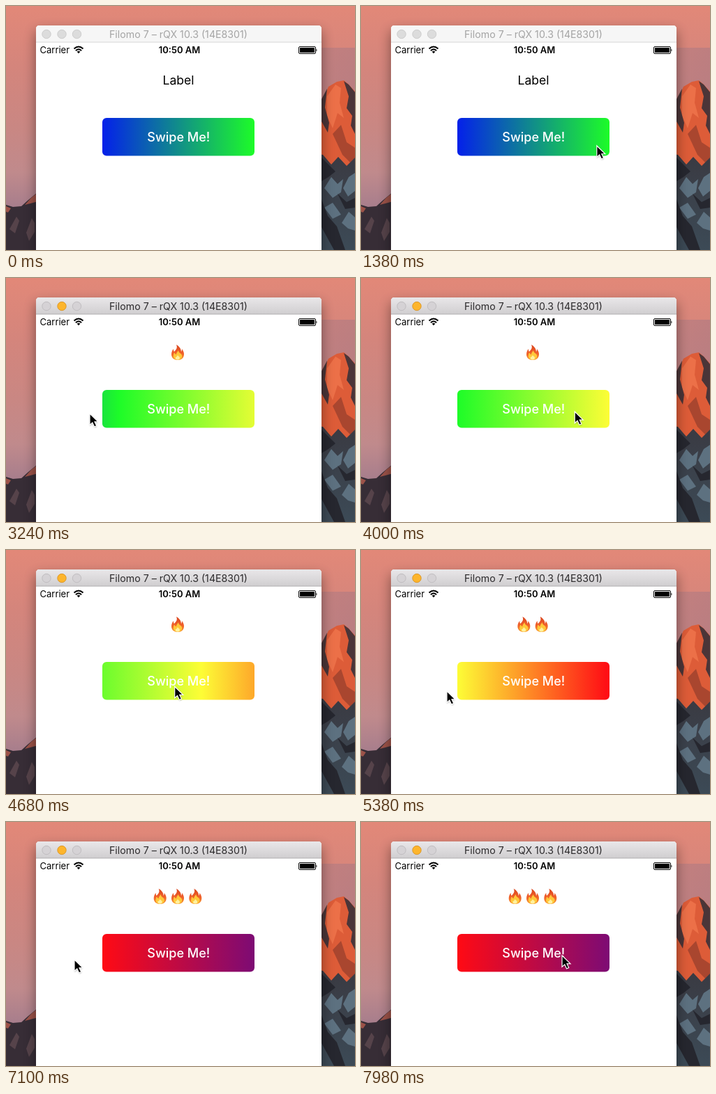
An HTML page that plays this animation: 500 px wide and 351 px high, repeating every 8 s.

```html
<!DOCTYPE html>
<html lang="en">
<head>
<meta charset="utf-8">
<title>Swipe button</title>
<style>
  html, body { margin: 0; width: 100%; height: 100%; overflow: hidden; }
  svg { display: block; width: 100vw; height: 100vh; }
  text { font-family: Inter, Roboto, sans-serif; }
  .mid { text-anchor: middle; }
</style>
</head>
<body>
<svg viewBox="0 0 500 351">
  <defs>
    <linearGradient id="sky" x2="0" y2="1">
      <stop stop-color="#e28878"/>
      <stop offset=".25" stop-color="#d4857c"/>
      <stop offset=".5" stop-color="#c98783"/>
      <stop offset=".68" stop-color="#c08a8c"/>
      <stop offset=".82" stop-color="#a87e8c"/>
    </linearGradient>
    <linearGradient id="dusk">
      <stop offset=".55" stop-color="#a87884" stop-opacity="0"/>
      <stop offset="1" stop-color="#a87884" stop-opacity=".55"/>
    </linearGradient>
    <linearGradient id="rock" x2="0" y2="1">
      <stop stop-color="#3a3a42"/>
      <stop offset="1" stop-color="#3c4a56"/>
    </linearGradient>
    <linearGradient id="bar" x2="0" y2="1">
      <stop stop-color="#e9e7e9"/>
      <stop offset="1" stop-color="#d0ced0"/>
    </linearGradient>
    <linearGradient id="swipe" gradientUnits="userSpaceOnUse" x1="138" x2="1010" y1="0" y2="0">
      <stop stop-color="#0420ea"/>
      <stop offset=".25" stop-color="#1dfc28"/>
      <stop offset=".5" stop-color="#fdfd36"/>
      <stop offset=".75" stop-color="#ff0a14"/>
      <stop offset="1" stop-color="#7d0b74"/>
    </linearGradient>
    <linearGradient id="flame" x2="0" y2="1">
      <stop stop-color="#d9451f"/>
      <stop offset=".55" stop-color="#f0602a"/>
      <stop offset="1" stop-color="#f79a2c"/>
    </linearGradient>
    <filter id="blur" x="-20%" y="-20%" width="140%" height="140%">
      <feGaussianBlur stdDeviation="9"/>
    </filter>
    <filter id="soft" x="-50%" y="-50%" width="200%" height="200%">
      <feGaussianBlur stdDeviation="1"/>
    </filter>
    <g id="fire">
      <path fill="url(#flame)" d="M-2 -11C2 -9 5 -5 5 -1C6 -2 6 -4 6 -5C9 -1 10 3 8 7C6 10 3 11 0 11C-5 11 -9 8 -9 3C-9 0 -8 -3 -6 -5C-6 -3 -6 -2 -5 -1C-2 -4 0 -7 -2 -11Z"/>
      <path fill="#ffc83a" d="M1 -3C1 1 5 1 6 4C7 8 4 10.500 0 10.500C-4 10.500 -7 8 -6 4C-6 2 -5 1 -5 0C-4 2 -3 3 -2 3C-2 0 0 -1 1 -3Z"/>
      <path fill="#fff1a0" d="M0 4C1 6 3 6 3 8C3 10 1 10.500 0 10.500C-2 10.500 -4 9 -3 7C-2 7 -1 6 0 4Z"/>
    </g>
  </defs>

  <!-- Wallpaper -->
  <rect width="500" height="351" fill="url(#sky)"/>
  <rect y="60" width="500" height="140" fill="url(#dusk)"/>
  <path fill="#372d36" d="M0 286L10 289L22 288L32 279L50 264V351H0Z"/>
  <path fill="#9c5248" d="M27 286L36 276L46 268V281L35 284ZM0 288L7 291L3 297L0 296Z"/>
  <path fill="#56434a" d="M5 321L15 303L19 309L13 327ZM29 326L37 305L41 312V325L33 338Z"/>
  <path fill="#dd5c38" d="M440 146L453 136L462 116L474 109L484 107L490 112L500 123V260H440Z"/>
  <path fill="#ec7048" d="M460 130L472 113L480 118L478 139L484 161L475 154L468 176L460 158Z"/>
  <path fill="#4b3538" d="M484 108L491 113L500 124V184L494 172L496 158L488 147L491 130ZM452 134L460 119L457 146L463 168L461 182L452 166Z"/>
  <path fill="#a9462f" d="M468 184L480 171L488 196L500 204V232L482 214Z"/>
  <path fill="url(#rock)" d="M440 212L454 214L466 228L476 217L488 230L500 218V351H440Z"/>
  <path fill="#5d7180" d="M456 262L466 246L475 256L483 249L480 268L468 276ZM483 262L491 246L500 240V266L490 274ZM456 290L468 283L480 300L468 306ZM481 312L491 296L500 304V323L490 320Z"/>
  <path fill="#26272f" d="M452 218L464 230L472 238L462 246L452 252ZM452 278L461 302L474 317L486 351H470L452 318ZM475 270L488 282L500 276V290L486 292Z"/>

  <!-- Window -->
  <rect x="43" y="36" width="409" height="330" opacity=".42" filter="url(#blur)"/>
  <path fill="#fff" d="M43 351V33Q43 28 48 28H447Q452 28 452 33V351Z"/>
  <path id="titlebar" d="M43 52V33Q43 28 48 28H447Q452 28 452 33V52Z"/>
  <path id="rule" d="M43 52H452"/>
  <g id="lights" stroke-width="1">
    <circle cx="58" cy="40.500" r="6.200"/>
    <circle cx="80" cy="40.500" r="6.200"/>
    <circle cx="101.500" cy="40.500" r="6.200"/>
  </g>
  <text id="title" class="mid" x="247" y="46" font-size="14.200">Filomo 7 – rQX 10.3 (14E8301)</text>

  <!-- Status bar -->
  <text x="48.500" y="68" font-size="13">Carrier</text>
  <path fill="none" stroke="#000" stroke-width="1.900" d="M97.500 61.500Q104 55.500 110.500 61.500M99.900 64.200Q104 60.500 108.100 64.200"/>
  <path d="M101.700 65.800Q104 63.800 106.300 65.800L104 68.200Z"/>
  <text class="mid" x="248.500" y="68" font-size="13" font-weight="600">10:50 AM</text>
  <rect x="419.500" y="58.500" width="24" height="10" rx="1.500" fill="none" stroke="#000" stroke-width="1"/>
  <rect x="421" y="60" width="21" height="7" rx=".5"/>
  <path d="M444.500 61.500Q446.500 63.500 444.500 65.500Z"/>

  <!-- Content -->
  <text id="label" class="mid" x="247" y="112.700" font-size="17.600">Label</text>
  <g id="fires"></g>
  <rect x="138" y="161" width="218" height="54.500" rx="6" fill="url(#swipe)"/>
  <text class="mid" x="247.300" y="195" font-size="18" font-weight="500" fill="#fff">Swipe Me!</text>

  <g id="cursor">
    <path d="M0 1V18L4 14L7 20L10 19L7 13H12Z" opacity=".35" filter="url(#soft)"/>
    <path d="M0 0V16.500L3.800 13L6.600 19L9.700 17.600L7 11.800H12Z" stroke="#fff" stroke-width="1.200"/>
  </g>
</svg>
<script>
const LOOP = 8000, ACTIVATED = 1760, PAGE_WIDTH = 218;
const $ = id => document.getElementById(id);

// Rows: time, then the values reached at that time.
const cursorPath = [
  [300, 515, 372], [1250, 338, 201], [2250, 334, 200],
  [3230, 120, 195], [3420, 120, 195],
  [4130, 324, 192], [4290, 324, 192],
  [5180, 123, 203], [5400, 123, 203],
  [5950, 316, 201], [6060, 316, 201],
  [6860, 98, 198], [7150, 98, 198], [7970, 288, 192]
];
const pagePath = [
  [2250, 0], [3220, .89], [3260, .89], [3400, 1],
  [4350, 1], [5180, 2], [6060, 2], [6860, 3]
];

function sample(path, t) {
  const next = path.findIndex(row => row[0] > t);
  if (next === 0) return path[0].slice(1);
  if (next < 0) return path[path.length - 1].slice(1);
  const a = path[next - 1], b = path[next];
  const p = (t - a[0]) / (b[0] - a[0]);
  const eased = p * p * (3 - 2 * p);
  return a.slice(1).map((v, i) => v + (b[i + 1] - v) * eased);
}

function paint(element, fill, stroke = 'none') {
  element.setAttribute('fill', fill);
  element.setAttribute('stroke', stroke);
}

function showCount(count) {
  $('label').style.display = count ? 'none' : '';
  $('fires').innerHTML = Array.from({ length: count }, (_, i) =>
    `<use href="#fire" x="${246 + (i - (count - 1) / 2) * 25.3}" y="107"/>`).join('');
}

function showActive(active) {
  paint($('titlebar'), active ? 'url(#bar)' : '#f6f6f6');
  paint($('rule'), 'none', active ? '#aeacae' : '#d6d6d6');
  paint($('title'), active ? '#2c2a2c' : '#a4a4a4');
  const grey = active ? ['#d5d2d5', '#c0bdc0'] : ['#dcdcdc', '#cdcdcd'];
  [...$('lights').children].forEach((light, i) =>
    paint(light, ...(active && i === 1 ? ['#fdb52c', '#dc982a'] : grey)));
}

function draw(t) {
  const [x, y] = sample(cursorPath, t);
  const [page] = sample(pagePath, t);
  $('cursor').setAttribute('transform', `translate(${x} ${y})`);
  $('swipe').setAttribute('gradientTransform', `translate(${-page * PAGE_WIDTH} 0)`);
  showCount(Math.round(page));
  showActive(t >= ACTIVATED);
}

const start = performance.now();
function tick() {
  draw((performance.now() - start) % LOOP);
  requestAnimationFrame(tick);
}
tick();
</script>
</body>
</html>
```
